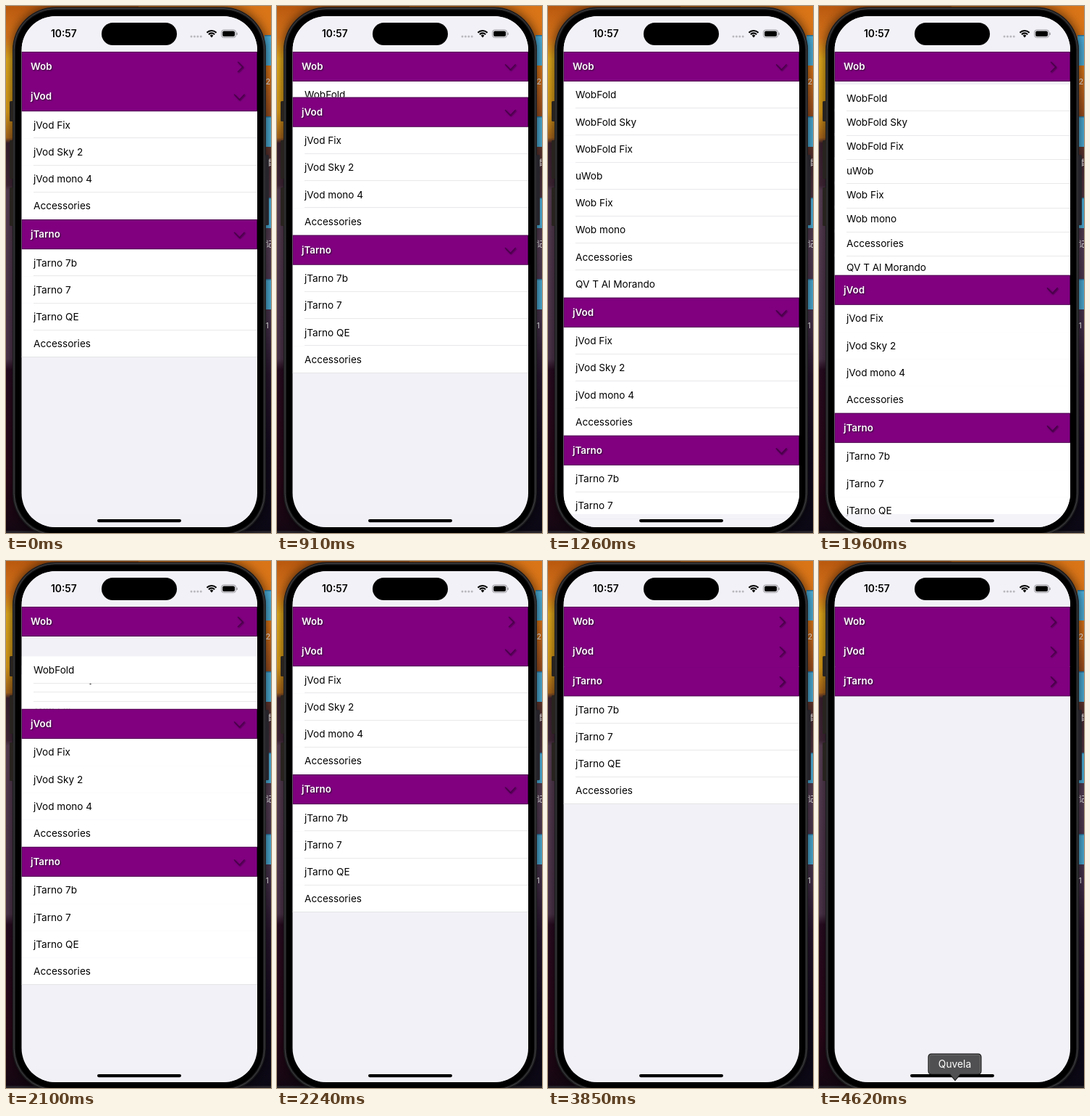
An HTML page with a canvas for the animation above (4.97 s loop, 366 by 726 pixels).

```html
<!DOCTYPE html>
<html lang="en">
<head>
<meta charset="utf-8">
<style>
  html, body { margin: 0; width: 100%; height: 100%; overflow: hidden; background: #160918; }
  canvas { display: block; }
</style>
</head>
<body>
<canvas id="stage" width="366" height="726"></canvas>
<script>
const ctx = document.getElementById('stage').getContext('2d');
const LOOP = 4970, STEP = 70, DURATION = 340;
const LEFT = 21.5, RIGHT = 347, TOP = 62.8, HEADER = 41.2, ROW = 37.2;
const PURPLE = '#800080', DARK_PURPLE = '#4c004c', GREY = '#f2f1f7';
const SANS = 'Inter, "Noto Sans CJK SC", sans-serif';

// Each toggle: time of the tap, and how far the slide has already run by then.
const sections = [
  { title: 'Wob', open: false, toggles: [[910, 56], [1960, 68]],
    rows: ['WobFold', 'WobFold Sky', 'WobFold Fix', 'uWob', 'Wob Fix', 'Wob mono', 'Accessories', 'QV T Al Morando'] },
  { title: 'jVod', open: true, toggles: [[2800, -12]],
    rows: ['jVod Fix', 'jVod Sky 2', 'jVod mono 4', 'Accessories'] },
  { title: 'jTarno', open: true, toggles: [[3850, -5]],
    rows: ['jTarno 7b', 'jTarno 7', 'jTarno QE', 'Accessories'] }
];

const clamp = x => Math.max(0, Math.min(1, x));
const ease = x => x * x * (3 - 2 * x);

function rect(x, y, w, h, fill) {
  ctx.fillStyle = fill;
  ctx.fillRect(x, y, w, h);
}

function round(x, y, w, h, r, fill) {
  ctx.beginPath();
  ctx.roundRect(x, y, w, h, r);
  if (fill) { ctx.fillStyle = fill; ctx.fill(); }
}

function line(points, color, width) {
  ctx.beginPath();
  points.forEach(([x, y]) => ctx.lineTo(x, y));
  ctx.strokeStyle = color;
  ctx.lineWidth = width;
  ctx.stroke();
}

function text(s, x, y, size, color, weight = 400, align = 'left') {
  ctx.font = `${weight} ${size}px ${SANS}`;
  ctx.textAlign = align;
  ctx.textBaseline = 'middle';
  ctx.fillStyle = color;
  ctx.fillText(s, x, y + 0.5);
}

function shadow(blur, offset, alpha) {
  ctx.shadowBlur = blur;
  ctx.shadowOffsetX = ctx.shadowOffsetY = offset;
  ctx.shadowColor = `rgba(0,0,0,${alpha})`;
}

function gradient(x0, y0, x1, y1, ...stops) {
  const g = ctx.createLinearGradient(x0, y0, x1, y1);
  stops.forEach(([at, color]) => g.addColorStop(at, color));
  return g;
}

function drawDesktop() {
  rect(0, 0, 183, 726, gradient(0, 0, 0, 726, [0, '#b9590f'], [0.06, '#d8741a'], [0.1, '#eab01c'],
    [0.2, '#e0a018'], [0.25, '#b06a1c'], [0.26, '#3c2130'], [0.34, '#44283a'], [0.35, '#5b4057'],
    [0.67, '#51374f'], [0.69, '#2a0c22'], [0.9, '#2c0719'], [1, '#120712']));
  rect(183, 0, 183, 726, gradient(0, 0, 0, 726, [0, '#d97417'], [0.12, '#e07818'], [0.2, '#a6541f'],
    [0.3, '#4a2b33'], [0.45, '#584058'], [0.6, '#49344e'], [0.7, '#2a1730'], [0.85, '#130a1e'], [1, '#0b0814']));
  ['2', '推', '记', '1'].forEach((label, i) => {
    const y = 40 + i * 112;
    rect(357, y, 9, 42, '#4fb3df');
    rect(357, y, 9, 1.5, '#2b7ba5');
    text(label, 358.5, y + 64, 11, '#fff');
  });
  rect(0, 723, 366, 3, '#25222a');
}

// The lower edge of the phone lies just below the stage.
function drawPhone() {
  shadow(16, 0, 0.7);
  round(9, 1.5, 350, 729, 59, '#1b1b1d');
  shadow(0, 0, 0);
  [[131, 28], [185, 53], [250, 53]].forEach(([y, h]) => round(5, y, 5, h, 1.5, '#28231f'));
  round(358, 205, 5, 97, 1.5, '#26242a');
  ctx.strokeStyle = '#424245';
  ctx.lineWidth = 1;
  round(11, 3.5, 346, 725, 57);
  ctx.stroke();
  round(13, 5.5, 342, 721, 55, '#000');
}

function drawStatus() {
  rect(LEFT, 13, RIGHT - LEFT, TOP - 13, GREY);
  text('10:57', 62, 38, 13.8, '#000', 600);
  round(132, 23, 104, 31, 15.5, '#000');
  for (let i = 0; i < 4; i++) round(254.5 + i * 4.4, 40.5, 3, 3, 1.5, '#b9b8bd');
  ctx.lineWidth = 2.1;
  ctx.strokeStyle = '#000';
  [9, 5.6].forEach(r => {
    ctx.beginPath();
    ctx.arc(284, 43, r, -Math.PI * 0.76, -Math.PI * 0.24);
    ctx.stroke();
  });
  ctx.beginPath();
  ctx.moveTo(284, 43.5);
  ctx.arc(284, 43, 3.2, -Math.PI * 0.76, -Math.PI * 0.24);
  ctx.fillStyle = '#000';
  ctx.fill();
  ctx.lineWidth = 1;
  ctx.strokeStyle = '#96959a';
  round(297.5, 33, 20, 10.5, 3.2);
  ctx.stroke();
  round(299, 34.5, 17, 7.5, 2, '#000');
  round(318.5, 36.5, 1.3, 3.5, 0.6, '#96959a');
}

function drawRow(label, y, separator) {
  rect(LEFT, y, RIGHT - LEFT, ROW, '#fff');
  if (separator) rect(38, Math.round(y + ROW) - 1, RIGHT - 38, 1, '#e9e9eb');
  text(label, 38, y + ROW / 2 + 0.3, 13.6, '#000');
}

function drawRows(s, isLast, plain) {
  const height = s.rows.length * ROW * s.amount;
  if (!height) return;
  const top = s.y + HEADER;
  ctx.save();
  ctx.beginPath();
  ctx.rect(LEFT, top, RIGHT - LEFT, height);
  ctx.clip();
  // Closing rows gather behind the next header; earlier rows stay in front.
  const slide = s.closing ? 1 - s.amount : 0;
  const goal = isLast ? 0 : HEADER;
  for (let i = s.rows.length - 1; i >= 0; i--) {
    const rest = i * ROW;
    drawRow(s.rows[i], top + rest + (goal - rest) * slide, !plain && (slide || i < s.rows.length - 1));
  }
  ctx.restore();
  if (isLast) rect(LEFT, Math.round(top + height) - 1, RIGHT - LEFT, 1, '#e4e4e6');
}

function drawHeader(s, isLast) {
  const mid = s.y + HEADER / 2;
  // Touching headers merge: a closed one covers the dark edge below it.
  const overlap = s.amount || isLast ? -1 : 1.5;
  rect(LEFT + 1, s.y + 1, RIGHT - LEFT - 2, HEADER - 1 + overlap, PURPLE);
  shadow(2, 1, 0.65);
  text(s.title, 34, mid, 13.4, '#fff', 600);
  line(s.open ? [[315, mid - 3], [322.3, mid + 4.5], [329.5, mid - 3]]
              : [[320, mid - 6.5], [327, mid + 0.5], [320, mid + 7.5]], '#470047', 1.3);
  shadow(0, 0, 0);
}

function drawTooltip() {
  ctx.beginPath();
  ctx.roundRect(151.5, 679.5, 72, 27, 3.5);
  ctx.moveTo(181, 706.5);
  ctx.lineTo(188, 715);
  ctx.lineTo(195, 706.5);
  ctx.strokeStyle = '#111';
  ctx.lineWidth = 2;
  ctx.stroke();
  ctx.fillStyle = '#505052';
  ctx.fill();
  ctx.strokeStyle = '#777';
  ctx.lineWidth = 0.7;
  round(152.5, 680.5, 70, 25, 3);
  ctx.stroke();
  round(153, 681, 69, 25.5, 3, '#505052');
  text('Quvela', 187.5, 693, 13.8, '#fff', 400, 'center');
}

function layout(t) {
  let y = TOP;
  return sections.map(section => {
    const s = { ...section, y, closing: false, amount: +section.open };
    for (const [at, lead] of s.toggles) {
      if (t < at) break;
      const p = ease(clamp((t - at + lead) / DURATION));
      s.open = !s.open;
      s.amount = s.open ? p : 1 - p;
      s.closing = !s.open && p < 1;
    }
    y += HEADER + s.rows.length * ROW * s.amount;
    return s;
  });
}

function draw(t) {
  drawDesktop();
  drawPhone();
  ctx.save();
  round(LEFT, 14, RIGHT - LEFT, 704, 47);
  ctx.clip();
  rect(0, 0, 366, 726, GREY);

  const list = layout(t);
  const last = list.length - 1;
  list.forEach((s, i) => drawRows(s, i === last, i > 0 && list[0].closing));
  list.forEach(s => rect(LEFT, s.y, RIGHT - LEFT, HEADER, DARK_PURPLE));
  list.forEach((s, i) => drawHeader(s, i === last));
  rect(LEFT, 700, RIGHT - LEFT, 18, 'rgba(242,241,247,.8)');

  drawStatus();
  round(126, 707, 116, 4.2, 2.1, '#000');
  ctx.restore();
  if (t >= 4550) drawTooltip();
}

function frame() {
  const t = performance.now() % LOOP;
  draw(Math.floor(t / STEP) * STEP);
  requestAnimationFrame(frame);
}
frame();
</script>
</body>
</html>
```
